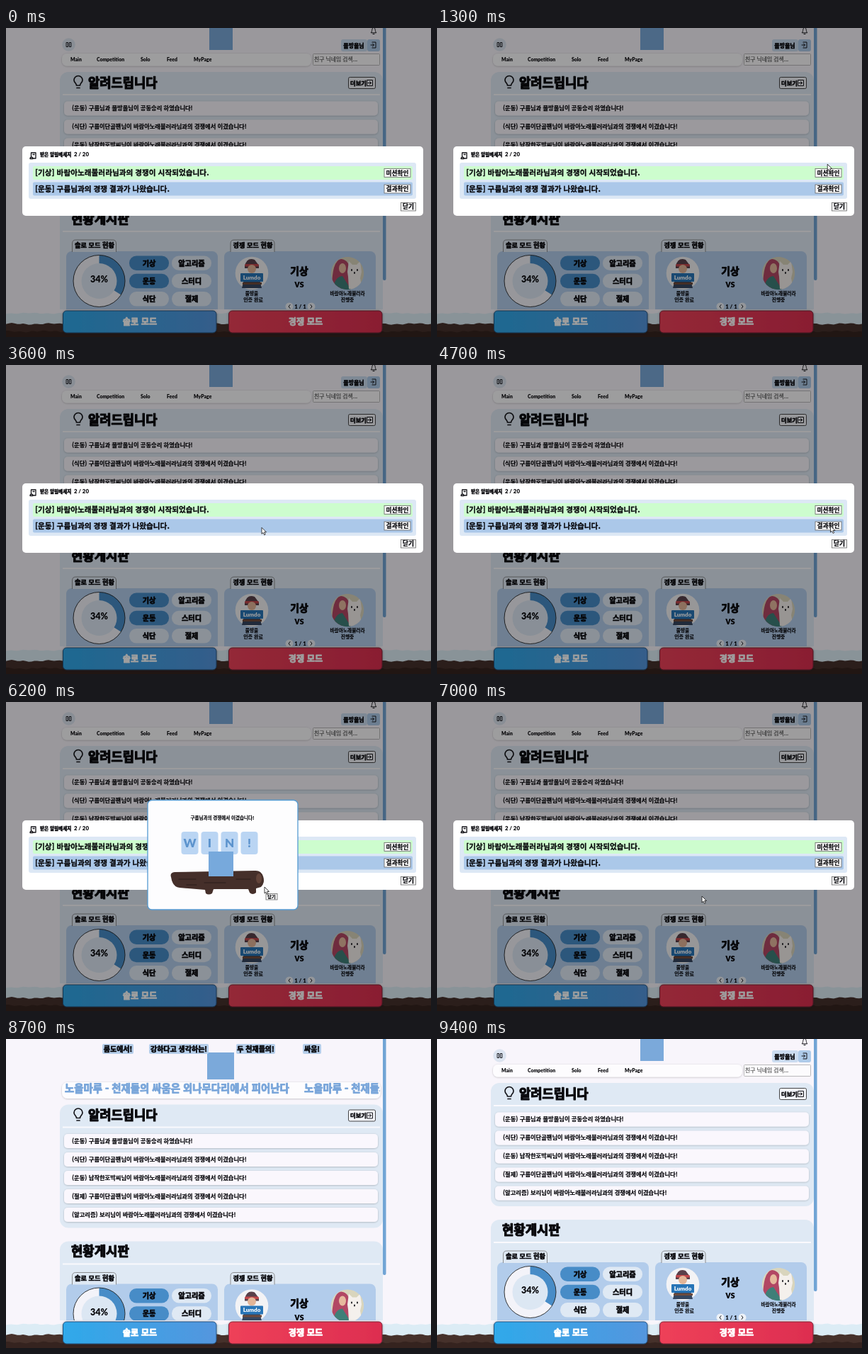
Write an HTML page that moves like this. It is 600 px wide and 436 px high and loops after 9500 ms.

```html
<!DOCTYPE html>
<html lang="ko">
<head>
<meta charset="utf-8">
<style>
html, body { margin: 0; width: 100%; height: 100%; overflow: hidden; background: #f8f5fb; }
svg { display: block; width: 600px; height: 436px; }
text {
  font-family: "Noto Sans CJK KR", "Noto Sans CJK", sans-serif; font-weight: 700; white-space: pre;
  color: #08080c; fill: currentColor; stroke: currentColor; stroke-width: .025em; stroke-linejoin: round;
}
.heavy { font-weight: 900; stroke-width: .065em; }
.latin { font-family: Lato, sans-serif; font-weight: 900; stroke-width: 0; }
.line { fill: none; stroke: #15151a; stroke-width: 1; stroke-linecap: round; stroke-linejoin: round; }
</style>
</head>
<body>
<svg id="stage" viewBox="0 0 600 436"></svg>
<script>
const LOOP = 9500;
const stage = document.getElementById('stage');

const rect = (x, y, w, h, r, fill, extra = '') =>
  `<rect x="${x}" y="${y}" width="${w}" height="${h}" rx="${r}" fill="${fill}" ${extra}/>`;
const circle = (x, y, r, fill, extra = '') =>
  `<circle cx="${x}" cy="${y}" r="${r}" fill="${fill}" ${extra}/>`;
const ellipse = (x, y, rx, ry, fill) => `<ellipse cx="${x}" cy="${y}" rx="${rx}" ry="${ry}" fill="${fill}"/>`;
const path = (d, fill, extra = '') => `<path d="${d}" fill="${fill}" ${extra}/>`;
const line = (d, width = 1, color = '#15151a') =>
  `<path class="line" d="${d}" style="stroke:${color};stroke-width:${width}"/>`;
const text = (x, y, size, str, extra = '') =>
  `<text x="${x}" y="${y}" font-size="${size}" ${extra}>${str}</text>`;
const middle = (x, y, size, str, extra = '') => text(x, y, size, str, `text-anchor="middle" ${extra}`);
const latin = (x, y, size, str, extra = '') => text(x, y, size, str, `class="latin" ${extra}`);
const latinMiddle = (x, y, size, str, extra = '') => latin(x, y, size, str, `text-anchor="middle" ${extra}`);
const group = (id, body) => `<g id="${id}">${body}</g>`;
const heavy = 'class="heavy"';
const ink = color => `style="color:${color}"`;
const edge = (color, width = 1) => `stroke="${color}" stroke-width="${width}"`;
const button = (x, y, w, h, size, label) =>
  rect(x + .5, y + .5, w - 1, h - 1, 0, '#f6f6f6', edge('#666', .8)) +
  middle(x + w / 2, y + h / 2 + size * .36, size, label);

// Header with navigation
const exitIcon = (x, y) => line(`M${x + 2} ${y}h5v8h-5M${x} ${y + 4}h4.5m-2-2l2 2l-2 2`);
const nav = [['Main', 91], ['Competition', 128], ['Solo', 190], ['Feed', 227], ['MyPage', 265]];
const navHeader =
  rect(287, -2, 33, 33, 0, '#7ba9da') +
  line('M515.5 6.5c2-2 .5-7 3.5-7s1.5 5 3.5 7zM518 8.5h2') +
  circle(88.5, 23.5, 9.3, '#dce4f0') +
  line('M85.5 20.5h2v6h-2zM89.8 20.5h2v6h-2z') +
  rect(473, 16, 37, 17, 3, '#cbdcf0') + middle(491, 27.5, 8, '물방울님', heavy) +
  rect(510, 16, 18, 17, 3, '#aecbe9') + exitIcon(515, 20) +
  rect(79, 36, 352, 17.5, 7, '#fdfcfe', 'filter="url(#soft)"') +
  nav.map(([label, x]) => latin(x, 47.2, 6.9, label)).join('') +
  rect(433.5, 36.5, 94, 16, 1, '#fcfbfd', edge('#aaa', .8)) +
  text(435, 47.3, 7.8, '친구 닉네임 검색...', 'style="color:#555;font-weight:400"');

// Header with slogan ticker
const pills = [['룸도에서!', 136, 44], ['강하다고 생각하는!', 202, 84], ['두 천재들의!', 325, 55], ['싸움!', 419, 26]];
const slogan = '노을마루 - 천재들의 싸움은 외나무다리에서 피어난다';
const tickerHeader =
  rect(284, 19, 38, 38, 0, '#7ba9da') +
  pills.map(([label, x, w]) => rect(x, 7, w, 14, 2, '#b5ceea') + middle(x + w / 2, 17.5, 10, label, heavy)).join('') +
  rect(79, 61, 450, 23, 8, '#fdfcfe', 'filter="url(#soft)"') +
  `<g clip-path="url(#tickerBox)">${group('ticker', [0, 338, 676].map(x =>
    text(x, 74.5, 14.4, slogan, heavy + ink('#7aa6da'))).join(''))}</g>`;

// Notice board and status board
const rival = '바람아노래불러라';
const notices = [
  '(운동) 구름님과 물방울님이 공동승리 하였습니다!',
  `(식단) 구름이단골팬님이 ${rival}님과의 경쟁에서 이겼습니다!`,
  `(운동) 납작한호박씨님이 ${rival}님과의 경쟁에서 이겼습니다!`,
  `(절제) 구름이단골팬님이 ${rival}님과의 경쟁에서 이겼습니다!`,
  `(알고리즘) 보리님이 ${rival}님과의 경쟁에서 이겼습니다!`
];
const noticeBoard =
  rect(76, 62, 456, 174, 12, '#dfe9f4') +
  line('M99.5 81c0-3-3.500-4-3.500-7.5a6 6 0 0 1 12 0c0 3.500-3.500 4.500-3.500 7.500zM100 84.500h4', 1.7) +
  text(116, 83.5, 17.7, '알려드립니다', heavy) +
  rect(483.5, 69.5, 38, 16, 2, '#f3f5fa', edge('#333', .9)) + text(486, 80.8, 8.3, '더보기', heavy) +
  line('M510 73.5h7.5v8h-7.5zM511 77.5h4.500m-2-2l2 2l-2 2') +
  rect(80, 93, 448, 2, 0, '#faf9fd') +
  notices.map((notice, i) =>
    rect(82, 103.5 + 26 * i, 443, 20, 5, '#faf7fd', 'filter="url(#soft)"') +
    text(93, 116.3 + 26 * i, 8.27, notice)).join('');

const angle = Math.PI * 2 * .34;
const wedge = `M131.5 357V320.5A36.5 36.5 0 0 1 ${131.5 + 36.5 * Math.sin(angle)} ${357 - 36.5 * Math.cos(angle)}Z`;
const panel = (x, tabX, label) =>
  rect(x, 315, 214, 100, 8, '#b2cceb') +
  path(`M${tabX} 316v-12q0-5 5-5h52q5 0 5 5v12`, '#dfe9f4', edge('#777', .8)) +
  text(tabX + 3.5, 310, 9.2, label, heavy);
const chips = ['기상', '알고리즘', '운동', '스터디', '식단', '절제'].map((label, i) => {
  const x = 174 + i % 2 * 60, y = 321.5 + (i >> 1) * 25.3;
  const active = i === 0 || i === 2;
  return rect(x, y, 56, 20.5, 10, active ? '#478cc7' : '#dfe9f4') + middle(x + 28, y + 14, 10.2, label, heavy);
}).join('');

const signAvatar =
  circle(347, 346, 23.3, '#f3f3f5') +
  path('M337 336q3-13 14-9l6 8v4h-20z', '#59404a') + rect(337, 333, 20, 3.5, 1.7, '#c2464a') +
  circle(347, 340, 6, '#e3b597') + path('M338 347h18l5 20h-28z', '#35465f') +
  rect(331, 346, 32, 12, 1, '#2875b7') + latinMiddle(347, 354.8, 8, 'Lumdo', ink('#fff')) +
  rect(334, 359, 27, 3, 0, '#6d4a3c');
const dogAvatar =
  `<g clip-path="url(#avatarBox)">` + circle(482, 346, 23.3, '#d9d5bd') +
  path('M460 368q0-40 13-42q13 1 12 20l2 22z', '#b24764') + ellipse(475, 339, 5, 7, '#e6b99d') +
  path('M461 372q2-21 14-22l14 22z', '#3f7f78') +
  path('M484 368l-1-17l-1-7l2-15l5 5h6l5-5l2 15l-2 9l4 20z', '#f4f0ec') +
  line('M488 341v1M496 341v1M492 345v1', 1.8) + '</g>';
const arrow = (x, d) => circle(x, 393, 5.5, '#edf2f8') + line(`M${x - d} 390.5l${2 * d} 2.5l${-2 * d} 2.5`);
const statusBoard =
  rect(76, 255, 456, 200, 12, '#dfe9f4') +
  text(92, 275.5, 17.8, '현황게시판', heavy) + rect(80, 286, 448, 2, 0, '#faf9fd') +
  panel(85, 93.5, '솔로 모드 현황') + panel(308, 317, '경쟁 모드 현황') +
  circle(131.5, 357, 36.5, '#f3f3f9') + path(wedge, '#478cc7') +
  circle(131.5, 357, 36.5, 'none', edge('#222', .9)) + circle(131.5, 357, 25, '#dce7f3') +
  latinMiddle(131.5, 359, 12.5, '34%') +
  chips + signAvatar + dogAvatar +
  middle(414, 347.5, 13.8, '기상', heavy) + latinMiddle(414, 366, 14, 'vs') +
  middle(347, 377, 6.7, '물방울') + middle(349, 386, 7, '인증 완료') +
  middle(482, 377, 6.7, rival) + middle(482, 386, 6.7, '진행중') +
  arrow(400, -1) + arrow(431, 1) + latinMiddle(415.5, 396, 7.8, '1 / 1');

// Snowy ground and mode buttons
const ridge = (y, size, phase) => {
  let d = 'M0 436';
  for (let x = 0; x <= 600; x += 4)
    d += `L${x} ${(y + size * (Math.sin(x * .11 + phase) + Math.sin(x * .37 + phase * 2))).toFixed(1)}`;
  return d + 'L600 436Z';
};
const ground =
  path(ridge(402.5, .5, 1), '#dcecf5') + path(ridge(417.5, .7, 4), '#46312b') + path(ridge(428, .7, 5), '#35231f');
const modeButton = (x, fill, border, label) =>
  rect(x, 399, 216.5, 31, 5, fill, edge(border) + ' filter="url(#glow)"') +
  middle(x + 108.5, 418.5, 12.2, label, heavy + ink('#fff'));
const buttons = modeButton(80.5, 'url(#blue)', '#245582', '솔로 모드') + modeButton(314.5, 'url(#red)', '#7d2337', '경쟁 모드');

// Message window and its two pop-ups
const message = (y, fill, str, label) =>
  rect(38, y, 536, 19, 2, fill) + text(41, y + 13.2, 10.65, str) + button(533.5, y + 3, 38, 13, 8.7, label);
const inbox =
  rect(23, 167, 566, 98, 5, '#fff') +
  line('M35.5 181v-5h6.5v8h-4M34 184.5c0-3 4-3 4 0zM38 178.5h2', 1.3) +
  text(48, 181.3, 6.6, '받은 알림메세지', heavy) + latin(96, 181.3, 7.8, '2 / 20') +
  rect(32, 190, 547, 51, 3, '#dde8f5') +
  message(195, '#cdfdce', `[기상] ${rival}님과의 경쟁이 시작되었습니다.`, '미션확인') +
  message(217.5, '#abc8e9', '[운동] 구름님과의 경쟁 결과가 나왔습니다.', '결과확인') +
  button(557, 246, 22, 12.5, 8.7, '닫기');
const mission =
  rect(247, 175, 118, 82, 4, '#fdfdfe', 'filter="url(#shade)"') +
  middle(305.5, 192.5, 10.2, '기상') +
  middle(306, 211, 6.4, 'lumdo입실시간을 찍어 인증해주세요!') +
  rect(288, 222, 36, 18, 3, '#3b82e4') + latinMiddle(306, 233.5, 7, 'Close', ink('#fff'));
const cards = [...'WIN!'].map((letter, i) =>
  rect(247.5 + 28 * i, 183, 24, 32, 4, '#bad5f3') +
  latinMiddle(259.5 + 28 * i, 205, 17, letter, ink('#5c93cd'))).join('');
const log =
  path('M233 247q-2-6 5-7l113-2q9-1 12 8t-3 15l-7 2v6q-5 4-9 0l-2-5h-49l-2 6q-5 3-9 0l-1-5-36-3q-10-1-12-15z', '#452f2a') +
  line('M244 250h24m12 5h30m-55 3h14m56-8h20', 1, '#2a1c1a') + ellipse(357, 249, 4, 7, '#63443a');
const win =
  rect(200, 138.5, 212, 154.5, 6, '#fdfdfe', edge('#559bd2', 1.3)) +
  middle(305.5, 165.5, 6.5, '구름님과의 경쟁에서 이겼습니다!') +
  cards + log + rect(286, 211, 35, 35, 0, '#77a9dc') +
  button(366.5, 270, 17, 9.5, 6.2, '닫기');

const gradient = (id, from, to) =>
  `<linearGradient id="${id}"><stop stop-color="${from}"/><stop offset="1" stop-color="${to}"/></linearGradient>`;
const shadow = (id, blur, alpha, color = '#000') =>
  `<filter id="${id}" x="-20%" y="-50%" width="140%" height="200%"><feDropShadow dx="0" dy=".6" stdDeviation="${blur}" flood-color="${color}" flood-opacity="${alpha}"/></filter>`;
const clip = (id, shape) => `<clipPath id="${id}">${shape}</clipPath>`;

stage.innerHTML =
  '<defs>' + gradient('blue', '#2fa9ea', '#5496de') + gradient('red', '#ee4059', '#dd2e50') +
  shadow('soft', .8, .25) + shadow('shade', 2, .3) + shadow('glow', 1.5, .4, '#223') +
  clip('tickerBox', rect(80, 61, 448, 23, 0, '#000')) +
  clip('avatarBox', circle(482, 346, 23.3, '#000')) +
  clip('pageBox', rect(0, 0, 600, 397, 0, '#000')) + '</defs>' +
  rect(0, 0, 600, 436, 0, '#f8f5fb') + ground +
  `<g clip-path="url(#pageBox)">${group('boards', noticeBoard + statusBoard)}</g>` +
  group('navHeader', navHeader) + group('tickerHeader', tickerHeader) +
  rect(532, -5, 4.5, 361, 2, '#71a4d5', 'id="scrollbar"') + buttons +
  group('inbox', rect(0, 0, 600, 436, 0, '#000', 'opacity=".38"') + inbox) +
  group('mission', mission) + group('win', win) +
  group('cursor', path('M0 0V9L2 7.2L3.7 10.5L5.2 9.7L3.6 6.5H6.5Z', '#fff', edge('#111', .8)));

const part = Object.fromEntries([...stage.querySelectorAll('g[id], #scrollbar')].map(el => [el.id, el]));
const show = (id, on) => { part[id].style.display = on ? '' : 'none'; };
const move = (id, x, y) => part[id].setAttribute('transform', `translate(${x} ${y})`);

// Pointer stops: time, x, y
const stops = [
  [0, 520, -14], [700, 520, -14], [1400, 553, 204], [1800, 553, 204], [2600, 310, 219.5], [3100, 307, 230],
  [3300, 307, 230], [4300, 555.5, 227], [5300, 555.5, 227], [6200, 365, 261], [6600, 374, 274],
  [7000, 374, 274], [7800, 573, 254], [8200, 573, 254], [8600, 610, 262], [LOOP, 610, 262]
];
function pointerAt(t) {
  const i = stops.findIndex(stop => stop[0] > t);
  const [t0, x0, y0] = stops[i - 1], [t1, x1, y1] = stops[i];
  const p = (t - t0) / (t1 - t0), k = p * p * (3 - 2 * p);
  return [x0 + (x1 - x0) * k, y0 + (y1 - y0) * k];
}

function draw(now) {
  const t = now % LOOP;
  const ticking = t >= 8600 && t < 9100;
  show('inbox', t < 8200);
  show('mission', t >= 1700 && t < 3300);
  show('win', t >= 5200 && t < 7000);
  show('navHeader', !ticking);
  show('tickerHeader', ticking);
  move('boards', 0, ticking ? 30.5 : 0);
  move('ticker', 83 - (t - 8700) * .05, 0);
  part.scrollbar.setAttribute('height', ticking ? 338 : 361);
  move('cursor', ...pointerAt(t));
  requestAnimationFrame(() => draw(performance.now()));
}
draw(0);
</script>
</body>
</html>
```
